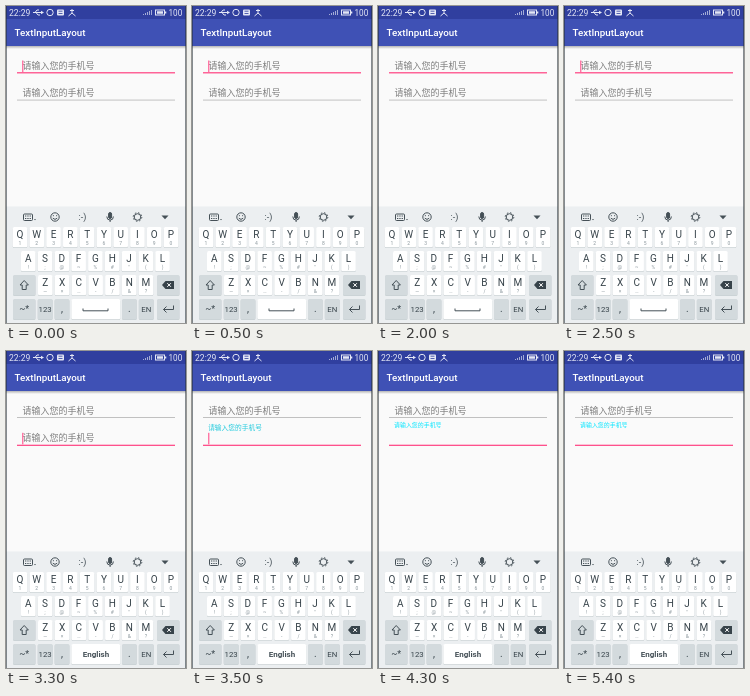
Animation, 180 px wide and 317 px high, one loop 5.9 s. Source, as an HTML page:

```html
<!DOCTYPE html>
<html lang="zh">
<head>
<meta charset="utf-8">
<title>TextInputLayout</title>
<style>
  html, body { margin: 0; width: 100%; height: 100%; overflow: hidden; background: #fafafa; }
  svg { display: block; width: 100%; height: 100%; }
  text { font-family: Roboto, "Noto Sans", sans-serif; }
  .hint { font-family: "Noto Sans CJK SC", "Noto Sans CJK", sans-serif; font-size: 9px; }
  .mid { text-anchor: middle; }
  .line { fill: none; stroke: #455057; stroke-width: 1; }
  .white { fill: none; stroke: #e3e6f5; stroke-width: 1; }
</style>
</head>
<body>
<svg id="stage" viewBox="0 0 180 317" preserveAspectRatio="none">
  <defs>
    <linearGradient id="shade" x2="0" y2="1">
      <stop offset="0" stop-color="#000" stop-opacity=".28"/>
      <stop offset="1" stop-color="#000" stop-opacity="0"/>
    </linearGradient>
  </defs>
  <rect width="180" height="317" fill="#fafafa"/>
  <rect width="180" height="13" fill="#303f9f"/>
  <rect y="13" width="180" height="27" fill="#3f51b5"/>
  <rect y="40" width="180" height="3" fill="url(#shade)"/>

  <g fill="#e3e6f5">
    <text x="3" y="9.8" font-size="8.6">22:29</text>
    <text x="162.5" y="9.8" font-size="8.2">100</text>
    <path class="white" d="M27 6.5h9M29 6.5l2-2.5h2M30 6.5l2 2.5h2"/>
    <path d="M35 4.7l3 1.8-3 1.8z"/>
    <circle cx="44" cy="6.5" r="3.2" class="white" stroke-width="1.4"/>
    <rect x="51" y="3.5" width="7" height="6" rx="1"/>
    <path d="M52.5 5.2h4M52.5 7.5h4" stroke="#303f9f" stroke-width=".8"/>
    <path class="white" d="M66 3v4l-3.5 3M66 7l3.5 3M64 4.5h4"/>
    <path d="M137 9h1V8h-1zM139 9h1V7h-1zM141 9h1V6h-1zM143 9h1V5h-1zM145 9h1V4h-1z" opacity=".65"/>
    <rect x="149.5" y="4" width="9" height="5" class="white" stroke-width=".8"/>
    <path d="M151 5.3h6v2.4h-6zM159 5.5h1.3v2H159z"/>
  </g>
  <text x="8.5" y="30" font-size="9.8" font-weight="500" fill="#fff">TextInputLayout</text>

  <text class="hint" x="16.5" y="63.4" fill="#7d7d7d">请输入您的手机号</text>
  <text class="hint" id="floating">请输入您的手机号</text>
  <rect id="line1" x="11"  width="158"/>
  <rect id="line2" x="11" width="158"/>
  <rect id="cursor" x="16.3" width="1" height="11.5" fill="#ff4081"/>

  <rect y="200.5" width="180" height="117" fill="#eceff1"/>
  <g id="keys"></g>
  <g id="tools" class="line">
    <rect x="17.5" y="208" width="9" height="6.5" rx="1"/>
    <path d="M19 210h6M19 212.5h6" stroke-dasharray="1 .7"/>
    <path d="M28 213h2l-1 1.3z" fill="#455057" stroke="none"/>
    <circle cx="49" cy="211" r="4.2"/>
    <path d="M46.8 212.2q2.2 2.4 4.4 0M47.4 209.2v1M50.6 209.2v1"/>
    <rect x="102.6" y="206.5" width="3" height="6" rx="1.5" fill="#455057"/>
    <path d="M100.8 210.5q0 3.6 3.3 3.6t3.3-3.6M104.1 214v2"/>
    <circle cx="131.5" cy="211" r="3.3"/>
    <circle cx="131.5" cy="211" r="4.3" stroke-dasharray="1.5 1.88"/>
    <path d="M155.5 209.5h7l-3.5 3.7z" fill="#455057" stroke="none"/>
    <text class="mid" x="76.5" y="214" font-size="9" fill="#455057" stroke="none">:-)</text>
  </g>
  <path id="spaceMark" class="line" d="M77 302.5v2.3h25v-2.3"/>
  <text id="english" class="mid" x="90" y="305.5" font-size="8" font-weight="700" fill="#455057">English</text>
  <path d="M.5 0V317M179.5 0V317" stroke="#263238" opacity=".55"/>
</svg>
<script>
const LOOP = 5900, FOCUS_MOVE = 3300;
const PINK = '#ff4081', GREY = '#a8a8a8';
const $ = id => document.getElementById(id);

function add(tag, attrs, content = '') {
  const node = document.createElementNS('http://www.w3.org/2000/svg', tag);
  set(node, attrs);
  node.textContent = content;
  $('keys').append(node);
}

function set(node, attrs) {
  for (const name in attrs) node.setAttribute(name, attrs[name]);
}

function key(x, y, width, fill = '#fff') {
  add('rect', { x, y: y + .6, width, height: 20.5, rx: 1.5, fill: '#c9d0d3' });
  add('rect', { x, y, width, height: 20.3, rx: 1.5, fill });
}

function label(text, x, y, size, fill = '#37434a') {
  add('text', { class: 'mid', x, y, 'font-size': size, fill }, text);
}

function letterRow(letters, marks, firstX, y) {
  [...letters].forEach((letter, i) => {
    const x = firstX + i * 16.78;
    key(x - 7.3, y, 14.6);
    label(letter, x, y + 11.2, 10);
    label(marks[i], x, y + 18, 5, '#8b979d');
  });
}

function buildKeyboard() {
  const dark = '#d3dadd';
  letterRow('QWERTYUIOP', '1234567890', 14, 221);
  letterRow('ASDFGHJKL', '!;@~%#"()', 22.3, 245);
  letterRow('ZXCVBNM', '—×…-/&?', 39.3, 269);
  for (const [x, y, width, text, size] of [
    [7, 269, 22.5], [151, 269, 22.5],
    [7, 293, 22.5, '~*', 9], [31.7, 293, 15, '123', 7.8], [48.6, 293, 14.8, ',', 10],
    [116, 293, 14.8, '.', 10], [132.8, 293, 15, 'EN', 7.8], [151, 293, 22.5]
  ]) {
    key(x, y, width, dark);
    if (text) label(text, x + width / 2, y + 13, size);
  }
  key(65.4, 293, 48.8);
  add('path', { class: 'line', d: 'M18.2 274.5l4.2 4.5h-2.2v4.5h-4v-4.5h-2.2z' });
  add('path', { fill: '#37434a', d: 'M156 279l3.5-4h8.5v8h-8.5z' });
  add('path', { stroke: '#fff', d: 'M161.3 277.2l3.6 3.6m0-3.6l-3.6 3.6' });
  add('path', { class: 'line', d: 'M167.5 299.5v4h-10m3-3l-3 3 3 3' });
}

const mix = (a, b, p) => a + (b - a) * p;
const mixColor = (a, b, p) => `rgb(${a.map((v, i) => Math.round(mix(v, b[i], p)))})`;

function cursorVisible(t) {
  if (t < 200) return true;
  if (t < FOCUS_MOVE) return Math.floor(t / 500) % 2 === 1;
  return t < 4300 || (t >= 4900 && t < 5400);
}

function render(time) {
  const t = time % LOOP;
  const second = t >= FOCUS_MOVE;
  const step = Math.floor(t / 100) * 100;
  const p = Math.min(1, Math.max(0, (step - FOCUS_MOVE) / 300));
  const ease = p * p * (3 - 2 * p);

  set($('floating'), {
    transform: `translate(${mix(16.5, 16, ease)} ${mix(90.4, 75.5, ease)}) scale(${mix(1, .66, ease)})`,
    fill: mixColor([125, 125, 125], [0, 229, 255], ease)
  });
  set($('line1'), { y: 66.2, height: second ? .7 : 1.2, fill: second ? GREY : PINK });
  set($('line2'), { y: 93.7, height: second ? 1.2 : .7, fill: second ? PINK : GREY });
  set($('cursor'), { y: second ? 81.8 : 54.5, opacity: cursorVisible(t) ? 1 : 0 });
  set($('spaceMark'), { opacity: second ? 0 : 1 });
  set($('english'), { opacity: second ? 1 : 0 });
}

buildKeyboard();
const start = performance.now();
function tick() {
  render(performance.now() - start);
  requestAnimationFrame(tick);
}
tick();
</script>
</body>
</html>
```
